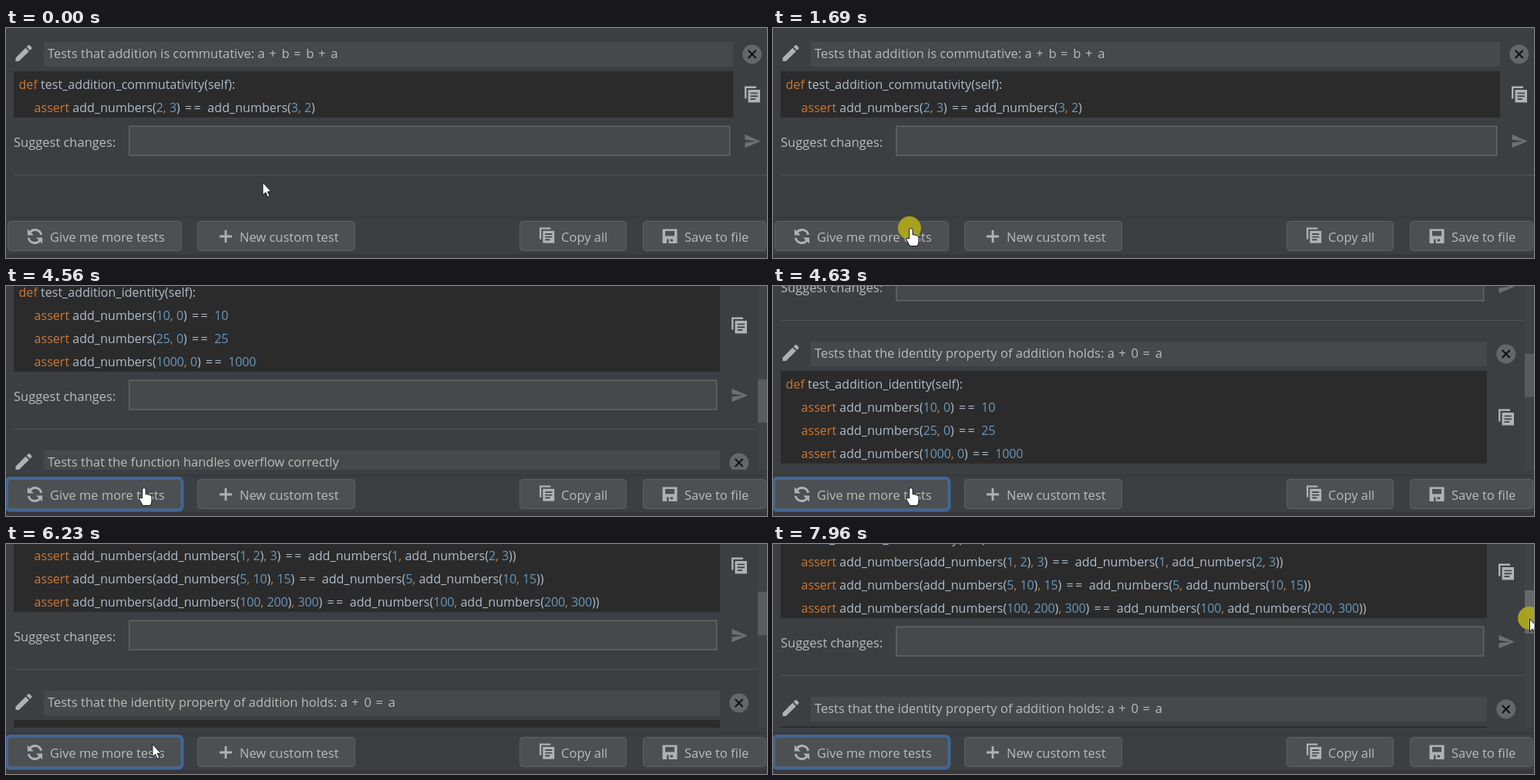
These frames come from a looping animation (987x298 px, 8000 ms). An HTML page:

```html
<!DOCTYPE html>
<html lang="en">
<head>
<meta charset="utf-8">
<title>Generated tests panel</title>
<style>
html, body { margin: 0; width: 100%; height: 100%; overflow: hidden; background: #3c3f41; }
svg { display: block; }
text { font: 16.5px "Open Sans", "Noto Sans", sans-serif; fill: #bbb; white-space: pre; }
.code { font-size: 16.1px; fill: #afbcca; }
.key, .comma { fill: #cc7832; }
.num { fill: #6897bb; letter-spacing: -.2px; }
.op { letter-spacing: 1.25px; }
.code .op { letter-spacing: 2.2px; }
.off { fill: #777; }
.icon { fill: #afb1b3; }
.line { fill: none; stroke: #afb1b3; }
.field { fill: #45494a; }
.box { fill: #45494a; stroke: #686b69; stroke-width: 1.3; }
.btn { fill: #4c5052; stroke: #5e6060; }
.btn.off { fill: #3c3f41; }
.ring { fill: none; stroke: #406694; stroke-width: 4; }
.cursor { fill: #fff; stroke: #111; }
</style>
</head>
<body>
<svg id="stage" width="987" height="298" viewBox="0 0 987 298"></svg>
<script>
const stage = document.getElementById('stage');
const LOOP = 8000, VIEW = 238, STEP = 200 / 3;

const CARDS = [
  ['Tests that addition is commutative: a + b = b + a', 'commutativity',
    'add_numbers(2, 3) == add_numbers(3, 2)'],
  ['Tests that addition is associative: (a + b) + c = a + (b + c)', 'associativity',
    'add_numbers(add_numbers(1, 2), 3) == add_numbers(1, add_numbers(2, 3))',
    'add_numbers(add_numbers(5, 10), 15) == add_numbers(5, add_numbers(10, 15))',
    'add_numbers(add_numbers(100, 200), 300) == add_numbers(100, add_numbers(200, 300))'],
  ['Tests that the identity property of addition holds: a + 0 = a', 'identity',
    'add_numbers(10, 0) == 10', 'add_numbers(25, 0) == 25', 'add_numbers(1000, 0) == 1000'],
  ['Tests that the function handles overflow correctly', 'overflow',
    'add_numbers(1000, 1000) == 2000']
];

const rect = (x, y, w, h, attrs) => `<rect x="${x}" y="${y}" width="${w}" height="${h}" ${attrs}/>`;
const path = (d, attrs) => `<path d="${d}" ${attrs}/>`;
const at = (x, y, body, scale = 1) => `<g transform="translate(${x} ${y}) scale(${scale})">${body}</g>`;
const span = (cls, s) => `<tspan class="${cls}">${s}</tspan>`;
const label = (x, y, s, cls = '') => `<text x="${x}" y="${y}" class="${cls}">${s}</text>`;
const markOps = s => s.replace(/ [=+] /g, m => span('op', m));
const markCode = s => s.replace(/(\bdef\b|\bassert\b)|(\d+)|(,)| == /g,
  (m, key, num, comma) => span(key ? 'key' : num ? 'num' : comma ? 'comma' : 'op', m));

const ICON = {
  pencil: path('M3 17.25V21h3.75L17.81 9.94l-3.75-3.75zM20.71 7.04a1 1 0 0 0 0-1.41l-2.34-2.34a1 1 0 0 0-1.41 0l-1.83 1.83 3.75 3.75z', 'class="icon"'),
  close: '<circle r="12.5" fill="#646667"/>' + path('M-5 -5L5 5M5 -5L-5 5', 'stroke="#111" stroke-width="2"'),
  copy: path('M1.2 16V1.2H15', 'class="line" stroke-width="2.4"') +
    path('M4.5 4.5H20V21H4.5Z', 'class="icon"') +
    path('M7.5 9H17M7.5 12.8H17M7.5 16.6H14', 'stroke="#3c3f41" stroke-width="1.7"'),
  send: path('M2 21l21-9L2 3v7l15 2-15 2z', 'fill="#6d7072"'),
  refresh: [0, 180].map(a => `<g transform="rotate(${a}) scale(-1 1)">` +
    path('M-8.2 -2A8.3 8.3 0 0 1 6.4 -5.4', 'class="line" stroke-width="2.9"') +
    path('M9.6 -9.5v8h-8z', 'class="icon"') + '</g>').join(''),
  plus: path('M-8 0H8M0 -8V8', 'class="line" stroke-width="2.8"'),
  save: path('M0 0H19V18.5H0ZM3.5 2.5V9H15.5V2.5ZM5.5 13V18.5H8V13ZM10 13V16H13.5V13Z', 'class="icon" fill-rule="evenodd"')
};
const ARROW = path('M0 0V16.5L3.8 13L6.4 19L9 17.8L6.4 12H11Z', 'class="cursor"');
const HAND = path('M-2.2 13V1.8a2.2 2.2 0 0 1 4.4 0V8q2-1 3.4.6 2-.7 2.6.8 1.8-.2 1.8 2V17q0 3-2 5.5H-1.5L-6 14.5q-.6-3 2-2z', 'class="cursor"');

function card([title, name, ...asserts], y, right) {
  const lines = [`def test_addition_${name}(self):`, ...asserts.map(a => 'assert ' + a)];
  const h = 30 * lines.length;
  const body = at(9, 18.5, ICON.pencil, 1.17) +
    rect(49, 18, right - 49, 32, 'class="field"') + label(54, 39, markOps(title)) +
    at(right + 24.7, 34, ICON.close) +
    rect(10, 56, right - 10, h, 'fill="#2b2b2b"') +
    lines.map((s, i) => label(i ? 36.5 : 16.5, 79 + 30 * i, markCode(s), 'code')).join('') +
    at(right + 15, 45.5 + h / 2, ICON.copy) +
    at(0, h, label(10, 94, 'Suggest changes:') +
      rect(160, 67.3, right - 164.4, 37.7, 'class="box"') +
      at(right + 13.5, 75, ICON.send, .97) +
      rect(10, 130, right + 38, 1, 'fill="#515456"'));
  return at(0, y, body);
}

function list(count, scroll) {
  const right = count > 1 ? 926 : 943;
  let y = -scroll, out = '';
  for (const c of CARDS.slice(0, count)) {
    out += card(c, y, right);
    y += 140 + 30 * (c.length - 1);
  }
  return out;
}

function scrollbar(top, height, held) {
  return rect(975, 0, 12, VIEW, 'fill="#404345"') +
    rect(975, top, 12, height, `fill="${held ? '#66696a' : '#595b5d'}"`);
}

function button(x, w, icon, textX, text, off) {
  const cls = off ? 'off' : '';
  return rect(x + .5, 250.5, w, 38, `rx="4" class="btn ${cls}"`) + icon + label(textX, 277, text, cls);
}

function toolbar(off, focused) {
  return rect(0, VIEW, 987, 60, 'fill="#3c3f41"') + rect(0, 245, 987, 1, 'fill="#323436"') +
    rect(0, 293, 987, 5, 'fill="#39363b"') +
    button(2, 225, at(37.5, 270, ICON.refresh), 57, 'Give me more tests', off) +
    button(248, 204, at(285, 270, ICON.plus), 303, 'New custom test', off) +
    button(666, 138, at(692, 258.5, ICON.copy, .96), 720, 'Copy all', off) +
    button(826, 159, at(851.5, 260.5, ICON.save), 880, 'Save to file', off) +
    (focused ? rect(.5, 249, 228, 41.5, 'rx="5" class="ring"') : '');
}

// Stepped progress: the first of n steps is already taken at the start time.
const steps = (t, start, n) => Math.min(1, (Math.floor((t - start) / STEP + .01) + 1) / n);
const ease = p => p * p * (3 - 2 * p);
const mix = (a, b, p) => a + (b - a) * p;
const arrow = (x, y) => at(x, y, ARROW);
const hand = (x, y) => at(x, y, HAND);

function pointer(t) {
  if (t < 160) return arrow(333, 200);
  if (t < 1030) {
    const p = ease(steps(t, 160, 13));
    return arrow(mix(333, 176, p), mix(200, 260, p));
  }
  if (t < 1760) return hand(179, 260);
  if (t < 2320) return arrow(177, 260);
  if (t < 4560) return arrow(177, 262);
  if (t < 5040) return hand(179, 262);
  if (t < 6230) return hand(180, 263);
  if (t < 7090) {
    const p = ease(steps(t, 6230, 13));
    return arrow(mix(177, 947, p), mix(262, 99, p));
  }
  if (t < 7760) return arrow(mix(953, 981, steps(t, 7090, 6)), 99);
  return arrow(981.5, t < 7960 ? 98 : 97);
}

function click(t) {
  const dot = (x, y) => `<circle cx="${x}" cy="${y}" r="15" fill="#aca51c" opacity=".95"/>`;
  return t >= 1690 && t < 1760 ? dot(177, 259) : t >= 7760 ? dot(981, 96) : '';
}

function scrollAt(t) {
  if (t < 4560) return 0;
  if (t < 4630) return 525;
  if (t < 4700) return 406;
  return t < 7860 ? 288 : t < 7960 ? 284 : 280;
}

function scene(t) {
  const count = t < 2840 ? 1 : t < 4560 ? 2 : 4;
  const scroll = scrollAt(t);
  let out = list(count, scroll);
  if (count === 2) out += scrollbar(0, 117, false);
  if (count === 4) out += scrollbar(scroll > 500 ? 121 : Math.round(scroll * .216), 56, t >= 7760);
  return out + toolbar(t >= 1760 && t < 4560, t >= 1760) + click(t) + pointer(t);
}

let shown = '';
function frame(now) {
  const next = scene(now % LOOP);
  if (next !== shown) stage.innerHTML = shown = next;
  requestAnimationFrame(frame);
}
frame(0);
</script>
</body>
</html>
```
